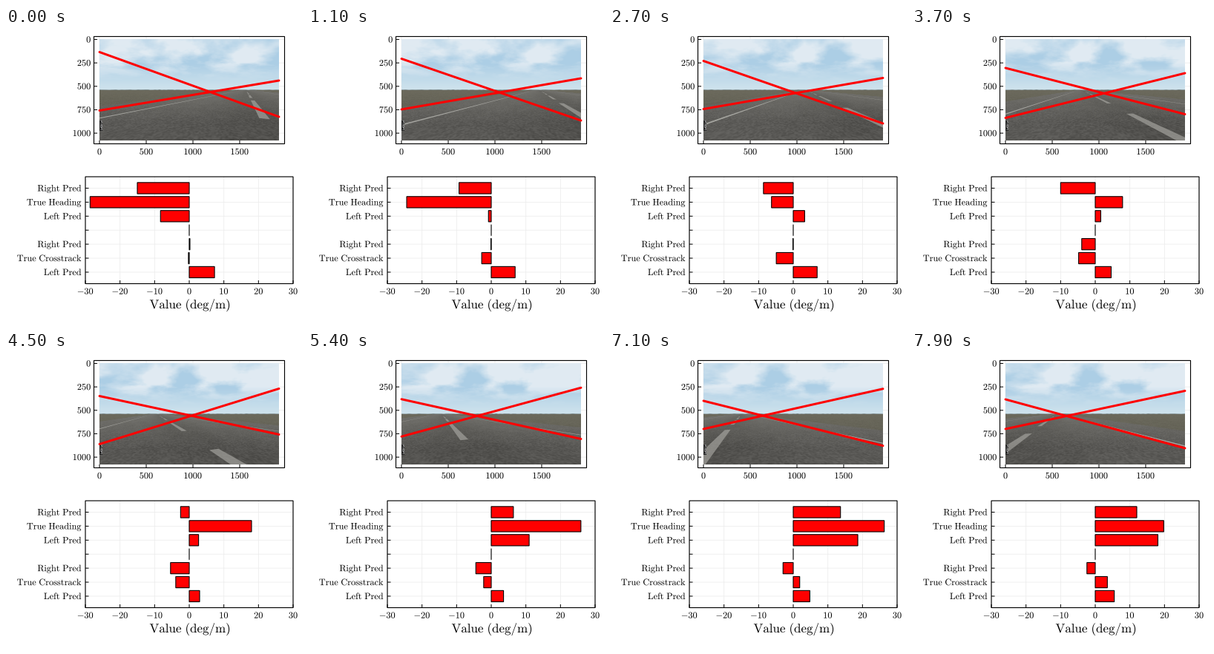
Write a matplotlib script that moves like this. It is 399x400 px and loops after 8000 ms.

```python
import numpy as np
import matplotlib.pyplot as plt
from matplotlib.animation import FuncAnimation
from matplotlib.patches import PathPatch, Polygon, Rectangle
from matplotlib.textpath import TextPath
from matplotlib.transforms import Affine2D

plt.rcParams["mathtext.fontset"] = "cm"
plt.rcParams["path.snap"] = False

W, H, DPI = 399, 400, 64
PT = 72 / DPI                       # points per pixel
FRAMES, STEP = 80, 100
L, R, T, B = 126, 368, 15, 152      # photo box
HORIZON, CENTER, FOCAL, CAM = 83, 247, 139, 2.55
EDGE, SHOULDER = 12.8, 20
ZERO, UNIT = 247, 280 / 60          # bar axis
ROWS = 273.2 + 18.92 * np.arange(-3, 4)

fig = plt.figure(figsize=(W / DPI, H / DPI), dpi=DPI, facecolor="white")
ax = fig.add_axes([0, 0, 1, 1])
ax.axis("off")


# ---------- static chart parts ----------
def line(x, y, color="black", width=1.0, z=5, **kw):
    return ax.plot(x, y, color=color, lw=width * PT, zorder=z, **kw)[0]


def label(x, y, s, size=12.3, align=0.5):
    """Outline text on baseline y; align 0.5 centres it, 1 ends it at x."""
    s = s.replace(" ", r"\ ")
    path = TextPath((0, 0), rf"$\mathrm{{{s}}}$", size=size)
    box = path.get_extents()
    place = Affine2D().translate(-box.x0 - align * box.width, 0).scale(1, -1).translate(x, y)
    ax.add_patch(PathPatch(place.transform_path(path), fc="black", ec="none", zorder=6))


def frame(x0, y0, x1, y1, xticks, yticks):
    for x in xticks:
        line([x, x], [y0, y1], "#ececec", 0.8, 0)
        line([x, x], [y1, y1 - 4.5], solid_capstyle="butt")
    for y in yticks:
        line([x0, x1], [y, y], "#ececec", 0.8, 0)
        line([x0, x0 + 4.5], [y, y], solid_capstyle="butt")
    ax.add_patch(Rectangle((x0, y0), x1 - x0, y1 - y0, fc="none", ec="black",
                           lw=1.15 * PT, zorder=5))


top_x = [(v, L + 0.126 * v) for v in (0, 500, 1000, 1500)]
top_y = [(v, 15.5 + 0.1266 * v) for v in (0, 250, 500, 750, 1000)]
frame(118.5, 11.5, 375.5, 156.5, [p for _, p in top_x], [p for _, p in top_y])
for v, p in top_x:
    label(p, 171, str(v))
for v, p in top_y:
    label(113.8, p + 4, str(v), align=1)

bar_x = [(v, ZERO + UNIT * v) for v in range(-30, 31, 10)]
frame(107, 201, 387, 345.5, [p for _, p in bar_x], ROWS)
for v, p in bar_x:
    label(p, 359.7, str(v).replace("-", "−"))
names = ["Right Pred", "True Heading", "Left Pred", "",
         "Right Pred", "True Crosstrack", "Left Pred"]
for name, y in zip(names, ROWS):
    if name:
        label(101.3, y + 4.1, name, align=1)
label(247.5, 379, "Value (deg/m)", 17)

bars = [ax.add_patch(Rectangle((ZERO, y - 7.6), 0, 15.2, fc="red", ec="black",
                               lw=1.1 * PT, zorder=4)) for y in ROWS]

# ---------- motion ----------
KEYS = [0, 1.1, 2.7, 3.7, 4.5, 6.3, 7.9]
PREDS = {
    0: [-15, -9.3, -8.6, -10, -2.5, 15.3, 12],
    2: [-8.3, -0.8, 3.3, 1.6, 2.7, 19.2, 18.1],
    4: [0.2, -0.1, -0.1, -3.9, -5.4, -3.5, -2.4],
    6: [7.3, 6.9, 6.9, 4.6, 3.0, 4.1, 5.5],
}
FALL = ([32.5, 41.5, 44.5, 54, 59.5, 68, 64],
        [120, 125, 129, 116.5, 111.5, 123.5, 130])
RISE = ([111.5, 110, 109.5, 121.5, 124.5, 104, 104],
        [71, 68, 67.5, 61, 49.5, 47, 52.5])


def at(keys, t):
    return np.interp(t, KEYS, keys)


def heading(t):
    return -0.5 * np.cos(t / 2)             # radians


def crosstrack(t):
    return -5 * np.sin(0.49 * t + 0.045)    # metres


def camera_x(t):
    """The camera sits ahead of the tracked point and a little to its left."""
    return crosstrack(t) + 1.5 * np.sin(heading(t)) - 0.5


# ---------- camera view ----------
GRID = np.random.default_rng(4).random((64, 64))


def noise(x, y):
    ix, iy = np.floor(x).astype(int), np.floor(y).astype(int)
    u, v = x - ix, y - iy
    u, v = u * u * (3 - 2 * u), v * v * (3 - 2 * v)

    def g(i, j):
        return GRID[(iy + j) % 64, (ix + i) % 64]
    return (g(0, 0) * (1 - u) + g(1, 0) * u) * (1 - v) + (g(0, 1) * (1 - u) + g(1, 1) * u) * v


def fbm(x, y, octaves=4):
    return sum(noise(x * 2 ** k + 7 * k, y * 2 ** k + 3 * k) / 2 ** (k + 1)
               for k in range(octaves))


def mix(a, b, k):
    k = np.asarray(k)[..., None]
    return np.asarray(a, float) * (1 - k) + np.asarray(b, float) * k


PX = np.arange(L, R) + 0.5
SKY_X, SKY_Y = np.meshgrid(PX, np.arange(T, HORIZON) + 0.5)
LAND_X, LAND_Y = np.meshgrid(PX, np.arange(HORIZON, B) + 0.5)


def azimuth(x, t):
    return heading(t) + np.arctan((x - CENTER) / FOCAL)


def sky(t):
    az = azimuth(SKY_X, t)
    el = (HORIZON - SKY_Y) / FOCAL
    d = 1 / (el + 0.22)
    c = fbm(20 + 2.2 * np.sin(az) * d, 20 + 2.2 * np.cos(az) * d + 0.04 * t, 5)
    cover = np.clip((c - 0.42) * 3 + el * 1.2, 0, 1)
    blue = mix((207, 227, 237), (172, 206, 229), np.clip(el * 4, 0, 1))
    return mix(blue, (230, 238, 244), cover * np.clip((el - 0.08) * 5, 0, 0.9))


def land(t):
    psi = heading(t)
    c, s = np.cos(psi), np.sin(psi)
    zc = FOCAL * CAM / (LAND_Y - HORIZON)
    xc = (LAND_X - CENTER) / FOCAL * zc
    lat = xc * c + zc * s + camera_x(t)
    lon = -xc * s + zc * c + 4.9 * t
    near = np.clip((LAND_Y - HORIZON) / 45, 0, 1)
    road = mix((114, 113, 108), (91, 90, 87), near)
    road -= 9 * np.exp(-(lat / 5) ** 2)[..., None]
    grass = mix((108, 106, 93), (92, 91, 80), near)
    out = mix(road, grass, np.clip((np.abs(lat) - SHOULDER) / 1.5, 0, 1))
    grain = (noise(lat * 9, lon * 7) - 0.5) * 18 * near
    grain += (fbm(lat * 0.9, lon * 0.6, 3) - 0.45) * 9 * np.clip(near * 4, 0, 1)
    out += grain[..., None]
    # hazy tree line
    out[0] = mix((122, 136, 138), (164, 180, 186), noise(azimuth(PX, t) * 50 + 90, PX * 0))
    return out


def view(t):
    return np.clip(np.vstack([sky(t), land(t)]), 0, 255).astype(np.uint8)


def strip(x, half, z0, z1, t):
    """Project a ground strip along the runway to screen points."""
    psi = heading(t)
    c, s = np.cos(psi), np.sin(psi)

    def side(xw):
        lo = max(z0, (1 - xw * s) / c)
        z = np.array([lo, max(z1, lo)])
        depth = xw * s + z * c
        return np.c_[CENTER + FOCAL * (xw * c - z * s) / depth, HORIZON + FOCAL * CAM / depth]
    x -= camera_x(t)
    return np.vstack([side(x - half), side(x + half)[::-1]])


photo = ax.imshow(view(0), extent=(L, R, B, T), aspect="auto",
                  interpolation="nearest", zorder=1)
clip = ax.add_patch(Rectangle((L, T), R - L, B - T, fc="none", ec="none"))


def paint(color, alpha):
    p = ax.add_patch(Polygon([(0, 0)] * 4, fc=color, ec="none", alpha=alpha, zorder=2))
    p.set_clip_path(clip)
    return p


edges = [paint("#c4c4be", 0.7) for _ in range(2)]
dashes = [paint("#a9a8a3", 0.65) for _ in range(5)]

# small readout in the photo corner
ax.add_patch(Rectangle((126, 125), 4, 14, fc="#1c1c1c", ec="none", zorder=2))
for k, ch in enumerate("383"):
    ax.text(128, 127.6 + 4.4 * k, ch, fontsize=5 * PT, color="white", ha="center",
            va="center", family="DejaVu Sans", zorder=3)

fall, rise = [line([L, R], [0, 0], "red", 3, 7, solid_capstyle="round") for _ in range(2)]

ax.set_xlim(0, W)
ax.set_ylim(H, 0)


def update(i):
    t = i * STEP / 1000
    photo.set_data(view(t))
    for p, x in zip(edges, (-EDGE, EDGE)):
        p.set_xy(strip(x, 0.16, 0, 120, t))
    for k, p in enumerate(dashes):
        far = 28 - 4.8 * t + 25 * k
        p.set_xy(strip(0, 0.38, far - 17, far, t))

    fall.set_ydata([at(k, t) for k in FALL])
    rise.set_ydata([at(k, t) for k in RISE])

    values = {row: at(k, t) for row, k in PREDS.items()}
    values[1] = np.degrees(heading(t))
    values[5] = crosstrack(t)
    for row, v in values.items():
        bars[row].set_x(ZERO + min(v, 0) * UNIT)
        bars[row].set_width(abs(v) * UNIT)
    return [photo, fall, rise, *edges, *dashes, *bars]


anim = FuncAnimation(fig, update, frames=FRAMES, interval=STEP, repeat=True,
                     repeat_delay=0, blit=False)
plt.show()
```
